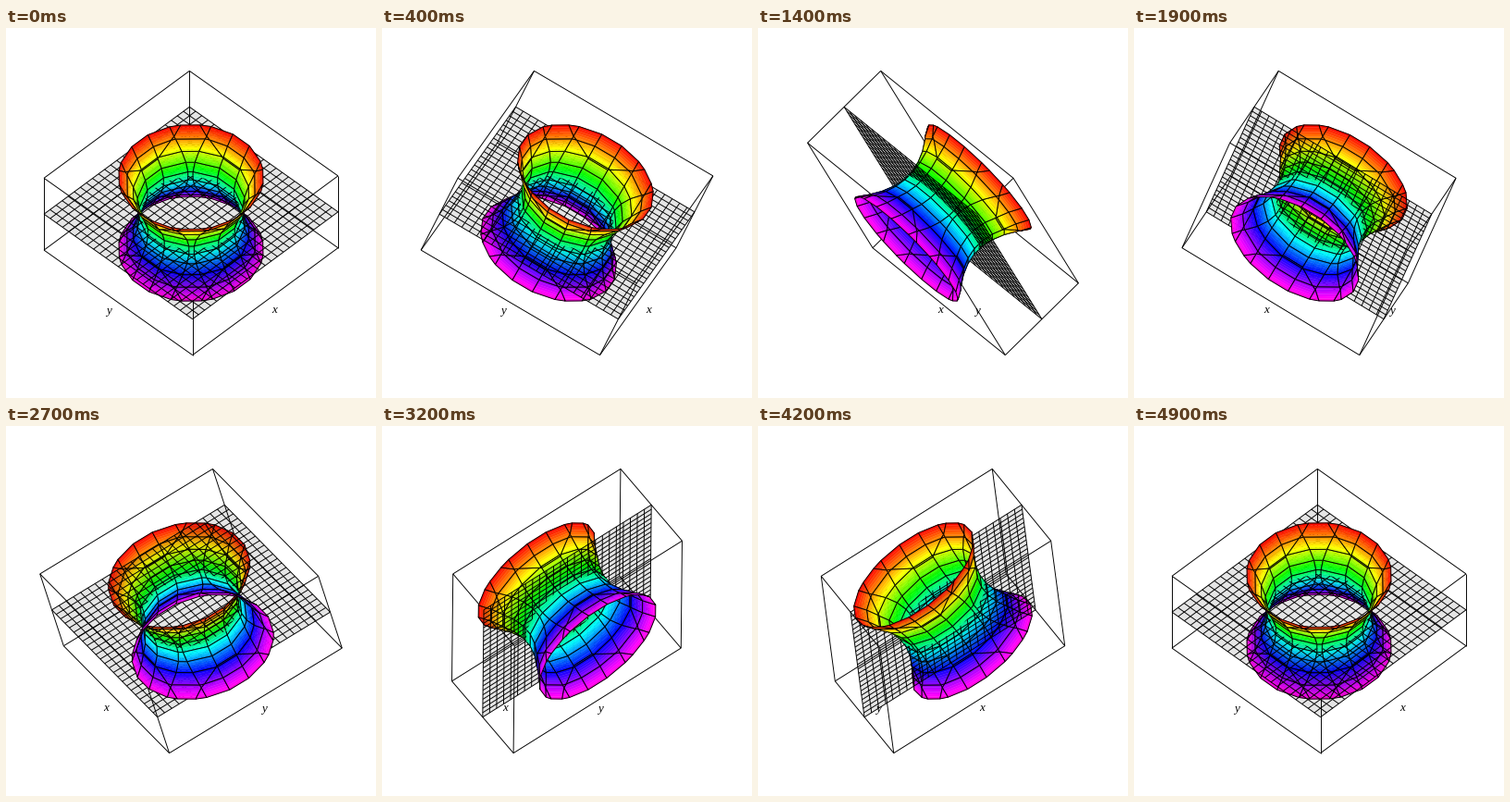
Animation of 400x400 px, one loop 5000 ms. Source, as a matplotlib script:

```python
import itertools
import colorsys
import numpy as np
import matplotlib.pyplot as plt
from matplotlib.animation import FuncAnimation
from matplotlib.collections import PolyCollection

SIZE, FRAMES, INTERVAL = 400, 50, 100
SCALE = 56.2                                   # pixels per unit
TURN, TILT = np.radians(44.4), np.radians(46.2)
GRID, PLANE_CELLS, STRIPS = 10, 24, 6
LINE, SEAM = 0.68, 0.36                        # widths in points
HUE_SPAN = 0.86
BLACK, CLEAR = (0, 0, 0, 1), (0, 0, 0, 0)
SHADE = (0, 0, 0, 0.1)

# Rows map x, y, z to screen right, screen down and towards the viewer.
BASIS = SCALE * np.array([
    [np.cos(TURN), np.sin(TURN) * np.sin(TILT), np.sin(TURN) * np.cos(TILT)],
    [-np.sin(TURN), np.cos(TURN) * np.sin(TILT), np.cos(TURN) * np.cos(TILT)],
    [0, -np.cos(TILT), np.sin(TILT)],
])


def field(p):
    return p[0] ** 2 + p[1] ** 2 - p[2] ** 2 - 1


def surface_cells():
    """Polygons where the hyperboloid crosses the cubes of a regular grid."""
    step = np.array([4, 4, 2]) / (GRID - 1)
    corners = [np.array(c) for c in itertools.product((0, 1), repeat=3)]
    edges = [(a, b) for a, b in itertools.combinations(corners, 2)
             if np.abs(a - b).sum() == 1]
    cells = []
    for index in itertools.product(range(GRID - 1), repeat=3):
        base = np.array([-2, -2, -1]) + np.array(index) * step
        points = []
        for a, b in edges:
            p, q = base + a * step, base + b * step
            fp, fq = field(p), field(q)
            if (fp < 0) != (fq < 0):
                points.append(p + (q - p) * fp / (fp - fq))
        if len(points) > 2:
            cells.append(order_loop(np.array(points)))
    return cells


def order_loop(points):
    mid = points.mean(axis=0)
    u = np.array([-mid[1], mid[0], 0])
    u /= np.linalg.norm(u)
    normal = mid * [1, 1, -1]
    v = np.cross(normal / np.linalg.norm(normal), u)
    offset = points - mid
    return points[np.argsort(np.arctan2(offset @ v, offset @ u))]


def clip(poly, level, sign):
    """Keep the part of a polygon above (sign 1) or below (sign -1) a level."""
    kept = []
    for p, q in zip(poly, np.roll(poly, -1, axis=0)):
        hp, hq = sign * (p[2] - level), sign * (q[2] - level)
        if hp >= 0:
            kept.append(p)
        if hp * hq < 0:
            kept.append(p + (q - p) * hp / (hp - hq))
    return np.array(kept)


def outline(poly):
    """Closed outline, left open along z = 0 where a cell was cut."""
    flat = np.abs(poly[:, 2]) < 1e-9
    for i in range(len(poly)):
        if flat[i] and flat[(i + 1) % len(poly)]:
            return np.roll(poly, -i - 1, axis=0)
    return np.vstack([poly, poly[:1]])


def hue(z):
    return (*colorsys.hsv_to_rgb((1 - z) / 2 * HUE_SPAN, 1, 1), 1)


def stroke(points):
    return np.array(points) @ BASIS, CLEAR, BLACK, LINE


def build_half(sign, cells):
    """One half of the surface: (centre, drawn items) for each cell."""
    levels = np.linspace(-1, 1, (GRID - 1) * STRIPS + 1)
    groups = []
    for cell in cells:
        part = clip(cell, 0, sign)
        if len(part) < 3:
            continue
        items = []
        for low, high in zip(levels, levels[1:]):
            if high <= part[:, 2].min() + 1e-9 or low >= part[:, 2].max() - 1e-9:
                continue
            strip = clip(part, low, 1)
            strip = clip(strip, high, -1) if len(strip) > 2 else strip
            if len(strip) > 2:
                color = hue((low + high) / 2)
                items.append((strip @ BASIS, color, color, SEAM))
        items.append(stroke(outline(part)))
        groups.append((part.mean(axis=0) @ BASIS, items))
    return groups


def build_plane():
    square = np.array([[-2, -2, 0], [2, -2, 0], [2, 2, 0], [-2, 2, 0]])
    items = [(square @ BASIS, SHADE, CLEAR, 0)]
    for t in np.linspace(-2, 2, PLANE_CELLS + 1):
        items.append(stroke([[t, -2, 0], [t, 2, 0]]))
        items.append(stroke([[-2, t, 0], [2, t, 0]]))
    return items


def build_box():
    corners = [np.array(c) for c in itertools.product((-2, 2), (-2, 2), (-1, 1))]
    return [stroke([a, b]) for a, b in itertools.combinations(corners, 2)
            if np.count_nonzero(a != b) == 1]


mesh = surface_cells()
upper, lower = build_half(1, mesh), build_half(-1, mesh)
plane, box = build_plane(), build_box()

fig = plt.figure(figsize=(SIZE / 100, SIZE / 100), dpi=100, facecolor="white")
ax = fig.add_axes([0, 0, 1, 1])
ax.set_xlim(0, SIZE)
ax.set_ylim(SIZE, 0)
ax.axis("off")

scene = PolyCollection([], closed=False, antialiaseds=True, zorder=2)
ax.add_collection(scene, autolim=False)
LABELS = [
    (ax.text(0, 308.5, name, family="Liberation Serif", style="italic",
             size=9.4, ha="center", va="baseline", zorder=1), right, depth)
    for name, right, depth in (("x", 90.5, 18), ("y", -89, 18))
]


def by_depth(groups, cos, sin):
    ranked = sorted(groups, key=lambda g: g[0][2] * cos - g[0][0] * sin)
    return [item for _, items in ranked for item in items]


def draw(frame):
    angle = 2 * np.pi * frame / (FRAMES - 1)
    cos, sin = np.cos(angle), np.sin(angle)
    far, near = (lower, upper) if cos > 0 else (upper, lower)
    items = box + by_depth(far, cos, sin) + plane + by_depth(near, cos, sin)
    points, faces, edges, widths = zip(*items)
    # The scene spins about the vertical axis of the screen.
    spin = np.array([[cos, 0], [0, 1], [sin, 0]])
    scene.set_verts([p @ spin + SIZE / 2 for p in points], closed=False)
    scene.set_facecolor(faces)
    scene.set_edgecolor(edges)
    scene.set_linewidth(widths)
    for label, right, depth in LABELS:
        label.set_x(SIZE / 2 + right * cos + depth * sin)
    return [scene] + [label for label, _, _ in LABELS]


anim = FuncAnimation(fig, draw, frames=FRAMES, interval=INTERVAL, repeat=True,
                     repeat_delay=0, blit=False)
plt.show()
```
